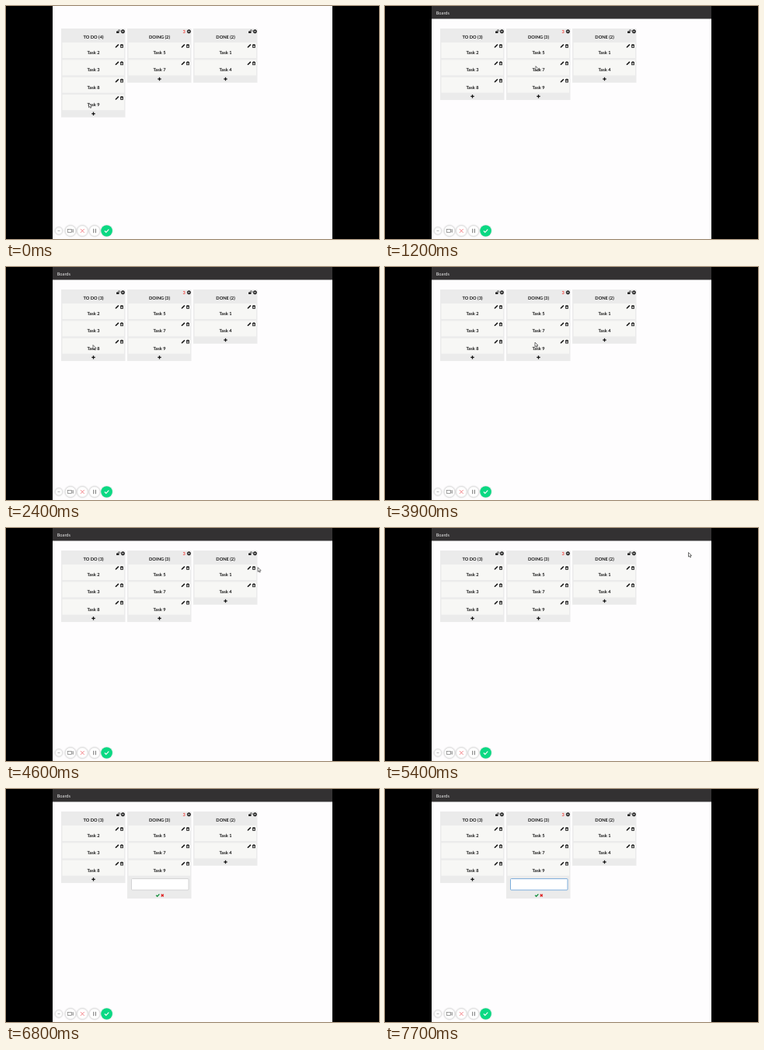
Recreate the animation shown at these times as an HTML page with a canvas. Size 480 by 300 pixels, loop 8 s.

```html
<!DOCTYPE html>
<html lang="en">
<head>
<meta charset="utf-8">
<title>Task board</title>
<style>
html, body { margin: 0; width: 100%; height: 100%; overflow: hidden; background: #000; }
canvas { display: block; }
</style>
</head>
<body>
<canvas id="stage" width="480" height="300"></canvas>
<script>
const ctx = document.getElementById('stage').getContext('2d');
const LOOP = 8000, STEP = 100, PITCH = 22.35;
const INK = '#151515';

// Pointer path: time, x, y. Equal neighbours are holds.
const path = [
  [0, 106.5, 125], [1199, 106.5, 125],
  [1200, 194, 77.5], [1500, 194, 77.5],
  [2400, 112, 100.5], [3899, 112, 100.5],
  [3900, 193, 97], [4200, 193, 97],
  [4800, 370, 34.5], [5300, 370, 34.5],
  [5400, 390.5, 31.5], [6200, 205.5, 111.5],
  [6300, 203, 112], [6500, 197, 114.5], [6800, 197, 114.5]
];

function pointerAt(t) {
  const i = path.findIndex(p => p[0] > t);
  if (i < 0) return null;
  const [t0, x0, y0] = path[i - 1], [t1, x1, y1] = path[i];
  const u = (t - t0) / (t1 - t0), k = u * u * (3 - 2 * u);
  return [x0 + (x1 - x0) * k, y0 + (y1 - y0) * k];
}

function rect(x, y, w, h, color) {
  ctx.fillStyle = color;
  ctx.fillRect(x, y, w, h);
}

function text(s, x, y, color = INK, weight = 700, size = 5.7, align = 'center') {
  ctx.font = `${weight} ${size}px Lato, sans-serif`;
  ctx.textAlign = align;
  ctx.fillStyle = color;
  ctx.fillText(s, x, y);
}

function line(points, color, width) {
  ctx.beginPath();
  points.forEach(([x, y], i) => i ? ctx.lineTo(x, y) : ctx.moveTo(x, y));
  ctx.strokeStyle = color;
  ctx.lineWidth = width;
  ctx.stroke();
}

function disc(x, y, r, fill, stroke, width = 0.8) {
  ctx.beginPath();
  ctx.arc(x, y, r, 0, Math.PI * 2);
  if (fill) { ctx.fillStyle = fill; ctx.fill(); }
  if (stroke) { ctx.strokeStyle = stroke; ctx.lineWidth = width; ctx.stroke(); }
}

function cross(x, y, r, color, width) {
  line([[x - r, y - r], [x + r, y + r]], color, width);
  line([[x + r, y - r], [x - r, y + r]], color, width);
}

function check(x, y, r, color, width) {
  line([[x - r, y], [x - r * 0.3, y + r * 0.7], [x + r, y - r * 0.7]], color, width);
}

function plus(x, y) {
  rect(x - 2.2, y - 0.65, 4.4, 1.3, INK);
  rect(x - 0.65, y - 2.2, 1.3, 4.4, INK);
}

function pencil(x, y) {
  line([[x - 1.5, y + 1.5], [x + 1.9, y - 1.9]], INK, 1.5);
  rect(x - 2.3, y + 1, 1.2, 1.2, INK);
}

function trash(x, y) {
  rect(x - 2, y - 1.8, 4, 0.8, INK);
  rect(x - 0.8, y - 2.4, 1.6, 0.7, INK);
  ctx.strokeStyle = INK;
  ctx.lineWidth = 0.8;
  ctx.strokeRect(x - 1.4, y - 1, 2.8, 3);
  rect(x - 0.3, y - 0.6, 0.6, 2.2, INK);
}

function cog(x, y) {
  disc(x, y, 1.55, null, INK, 1.3);
  for (let i = 0; i < 8; i++) {
    const a = i * Math.PI / 4;
    disc(x + 2.2 * Math.cos(a), y + 2.2 * Math.sin(a), 0.5, INK);
  }
}

function openLock(x, y) {
  rect(x - 2.2, y - 0.2, 3.4, 2.4, INK);
  ctx.beginPath();
  ctx.arc(x + 1.2, y - 0.9, 1.1, Math.PI, 0);
  ctx.lineTo(x + 2.3, y);
  ctx.moveTo(x + 0.1, y - 0.9);
  ctx.lineTo(x + 0.1, y);
  ctx.strokeStyle = INK;
  ctx.lineWidth = 0.7;
  ctx.stroke();
}

function column(x, name, tasks, limit, t, editable) {
  const mid = x + 41.5, end = 45 + tasks.length * PITCH;
  const editing = editable && t >= 6800;
  rect(x, 29, 82.5, end - 29 + (editing ? 29 : 9), '#ebebeb');
  if (limit) text(limit, x + 73.2, 34.8, '#f0403a');
  else openLock(x + 73.3, 32.7);
  cog(x + 79.4, 32.7);
  text(`${name} (${tasks.length})`, mid, 41.6);
  tasks.forEach((n, i) => {
    const y = 60 + i * PITCH;
    rect(x + 1.5, y - 13, 79.5, 20, '#f7f7f5');
    pencil(x + 72, y - 8.6);
    trash(x + 78, y - 8.6);
    text('Task ' + n, mid, y + 2);
  });
  if (editing) editor(x, end, t);
  else plus(mid, end + 4.3);
}

function editor(x, y, t) {
  const border = t < 7100 ? '#d4d4d5' : t < 7200 ? '#a9c1d8' : '#7eaedb';
  ctx.beginPath();
  ctx.roundRect(x + 5.5, y + 3.5, 73.5, 14.5, 1);
  ctx.fillStyle = '#fff';
  ctx.fill();
  ctx.strokeStyle = border;
  ctx.lineWidth = 1;
  ctx.stroke();
  if (t >= 7200 && t < 7700) rect(x + 12.6, y + 8, 0.8, 6, '#444');
  check(x + 39.3, y + 24.8, 2.1, '#17913f', 1.4);
  cross(x + 45.3, y + 24.9, 1.5, '#df2424', 1.3);
}

function controls() {
  const y = 289.5;
  ctx.save();
  ctx.shadowColor = 'rgba(0,0,0,.18)';
  ctx.shadowBlur = 2;
  disc(68, y, 4.7, '#fff', '#dedede', 0.6);
  [83, 98.3, 114].forEach(x => disc(x, y, 7, '#fff', '#dcdcdc', 0.6));
  disc(129.6, y, 7.3, '#0bd983');
  ctx.restore();
  rect(66.5, y - 0.3, 3, 0.7, '#999');
  ctx.strokeStyle = '#777';
  ctx.lineWidth = 0.7;
  ctx.strokeRect(79.5, y - 2, 4.8, 4);
  line([[84.5, y - 0.5], [86.6, y - 1.8], [86.6, y + 1.8], [84.5, y + 0.5]], '#777', 0.7);
  cross(98.3, y, 2.4, '#f0636a', 0.8);
  rect(112.3, y - 2.7, 0.9, 5.4, '#666');
  rect(114.9, y - 2.7, 0.9, 5.4, '#666');
  check(129.6, y, 2.7, '#fff', 1.1);
}

function pointer([x, y]) {
  ctx.beginPath();
  [[0, 0], [0, 5.6], [1.3, 4.5], [2.2, 6.4], [3.1, 6], [2.3, 4.1], [4, 4]]
    .forEach(([dx, dy]) => ctx.lineTo(x + dx, y + dy));
  ctx.closePath();
  ctx.fillStyle = '#fff';
  ctx.fill();
  ctx.strokeStyle = '#333';
  ctx.lineWidth = 0.7;
  ctx.stroke();
}

function draw(now) {
  const t = Math.floor(now % LOOP / STEP) * STEP;
  const moved = t >= 1200;
  ctx.textRendering = 'geometricPrecision';
  rect(0, 0, 480, 300, '#000');
  rect(60, 0, 360, 300, '#fefdfe');
  if (moved) {
    rect(60, 0, 360, 16.5, '#333132');
    text('Boards', 65.7, 10.8, '#eee', 400, 5.7, 'left');
  }
  column(71, 'TO DO', moved ? [2, 3, 8] : [2, 3, 8, 9], '', t);
  column(156, 'DOING', moved ? [5, 7, 9] : [5, 7], '3', t, true);
  column(241, 'DONE', [1, 4], '', t);
  controls();
  const pos = pointerAt(t);
  if (pos) pointer(pos);
  requestAnimationFrame(draw);
}
requestAnimationFrame(draw);
</script>
</body>
</html>
```
